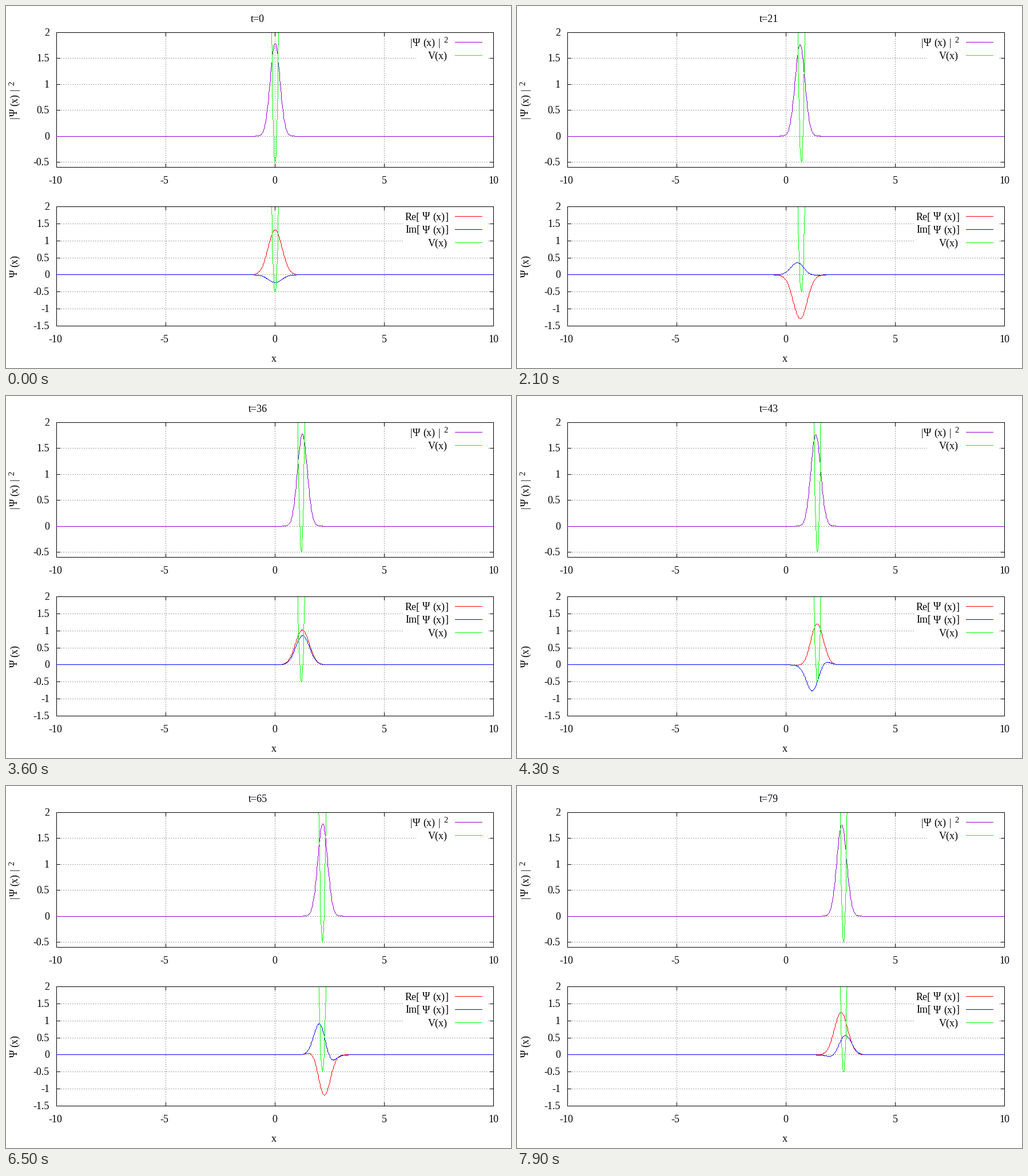
Write a matplotlib script that moves like this. It is 883 px wide and 634 px high and loops after 8000 ms.

```python
import numpy as np
import matplotlib.pyplot as plt
from matplotlib.animation import FuncAnimation

W, H, DPI = 883, 634, 64
PX = 72 / DPI  # points per pixel
STEPS, DT, OMEGA = 80, 1 / 30, 10.0
LEFT, RIGHT = 88, 852
BLACK, GRAY = (0, 0, 0), (160, 160, 160)
PURPLE, GREEN, RED, BLUE = (148, 0, 211), (0, 255, 0), (255, 0, 0), (0, 0, 255)

plt.rcParams["font.family"] = "Liberation Serif"
fig = plt.figure(figsize=(W / DPI, H / DPI), dpi=DPI, facecolor="white")
base = np.full((H, W, 3), 255, np.uint8)


def evolve(x, dx):
    """Split-step evolution of a Gaussian in a harmonic trap moving at speed 1."""
    k = 2 * np.pi * np.fft.fftfreq(len(x), dx)
    drift = np.exp(-0.5j * k**2 * DT)
    psi = (OMEGA / np.pi) ** 0.25 * np.exp(-OMEGA * x**2 / 2) + 0j
    states = []
    for n in range(STEPS):
        kick = np.exp(-0.25j * OMEGA**2 * (x - n * DT) ** 2 * DT)
        psi = kick * np.fft.ifft(drift * np.fft.fft(kick * psi))
        states.append(psi)
    return states


def nearest(a):
    return np.floor(np.asarray(a, float) + 0.5)


def stroke(img, xs, ys, color, rows=(0, H), dotted=False):
    """One-pixel polyline without smoothing, limited to the given rows."""
    xs, ys = nearest(xs), nearest(ys)
    length = np.maximum(abs(np.diff(xs)), abs(np.diff(ys)))
    s = np.concatenate([[0], np.cumsum(length)])
    i = np.arange(s[-1] + 1)
    col = nearest(np.interp(i, s, xs)).astype(int)
    row = nearest(np.interp(i, s, ys)).astype(int)
    keep = (row >= rows[0]) & (row < rows[1])
    if dotted:
        keep &= i % 4 < 2
    img[row[keep], col[keep]] = color


def px(x):
    return LEFT + (np.asarray(x) + 10) * (RIGHT - LEFT) / 20


def text(x, y, s, ha="left", size=18, rot=0):
    return fig.text(x / W, 1 - y / H, s, ha=ha, va="baseline",
                    fontsize=size * PX, rotation=rot, rotation_mode="anchor")


def pieces(x, y, parts, rot=0):
    """Place (offset, string) parts along a baseline; '^' raises a part."""
    for off, s in parts:
        up = 5.5 if s[0] == "^" else 0
        size = 14.5 if up else 18
        pos = (x - up, y - off) if rot else (x + off, y - up)
        text(*pos, s.lstrip("^"), size=size, rot=rot)


class Panel:
    def __init__(self, top, bottom, vmin, vmax, ticks, key):
        self.top, self.bottom, self.vmax = top, bottom, vmax
        self.scale = (bottom - top) / (vmax - vmin)
        for v in ticks:
            y = self.py(v)
            if 0 < y - top < key[1]:  # the grid leaves the legend free
                spans = [(LEFT, key[0]), (843, RIGHT)]
            else:
                spans = [(LEFT, RIGHT)]
            for span in spans:
                stroke(base, span, [y, y], GRAY, dotted=True)
            text(76, nearest(y) + 6, f"{v:g}", "right")
        for v in (-5, 0, 5):
            stroke(base, px([v, v]), [bottom, top], GRAY, dotted=True)
        for v in range(-10, 11, 5):
            for y, dy in ((top, 6), (bottom, -6)):
                stroke(base, px([v, v]), [y, y + dy], BLACK)
            text(px(v) - (2 if v < 0 else 0), bottom + 29, f"{v:g}", "center")
        for v in ticks:
            for x, dx in ((LEFT, 6), (RIGHT, -6)):
                stroke(base, [x, x + dx], [self.py(v)] * 2, BLACK)
        stroke(base, [LEFT, RIGHT, RIGHT, LEFT, LEFT],
               [top, top, bottom, bottom, top], BLACK)

    def py(self, v):
        return self.top + (self.vmax - v) * self.scale

    def curve(self, img, x, v, color):
        stroke(img, px(x), self.py(v), color, (self.top + 1, self.bottom))

    def key(self, row, color, x, parts):
        y = self.top + 17 + 23 * row
        stroke(base, [785, 832], [y, y], color)
        pieces(x, y + 6.5, parts)


N = 1000
x = -10 + 20 * np.arange(N) / N
states = evolve(x, 20 / N)

DENSITY = [(1, "|"), (5, "Ψ"), (23, "(x)"), (50, "|"), (59, "^2")]
WAVE = [(0, "Ψ"), (18, "(x)")]
POT = [(0, "V(x)")]

upper = Panel(46, 282, -0.6, 2, np.arange(-0.5, 2.1, 0.5), (716, 52))
lower = Panel(351, 560, -1.5, 2, np.arange(-1.5, 2.1, 0.5), (694, 75))

upper.key(0, PURPLE, 706, DENSITY)
upper.key(1, GREEN, 738, POT)
for row, (color, name) in enumerate([(RED, "Re["), (BLUE, "Im[")]):
    lower.key(row, color, 698, [(0, name), (30, "Ψ"), (48, "(x)"), (69, "]")])
lower.key(2, GREEN, 738, POT)

pieces(20, 198, DENSITY, rot=90)
pieces(20, 475, WAVE, rot=90)
text(468, 623, "x", "center")
title = text(440, 28, "", "center")
plot = fig.figimage(base, origin="upper", zorder=-1)


def draw(n):
    psi = states[n]
    img = base.copy()
    well = np.minimum(OMEGA**2 * (x - n * DT) ** 2 - 0.5, 6)
    upper.curve(img, x, abs(psi) ** 2, PURPLE)
    upper.curve(img, x, well, GREEN)
    lower.curve(img, x, psi.real, RED)
    lower.curve(img, x, psi.imag, BLUE)
    lower.curve(img, x, well, GREEN)
    plot.set_data(img)
    title.set_text(f"t={n}")
    return [plot, title]


anim = FuncAnimation(fig, draw, frames=STEPS, interval=100, repeat=True,
                     repeat_delay=0, blit=False)
plt.show()
```
